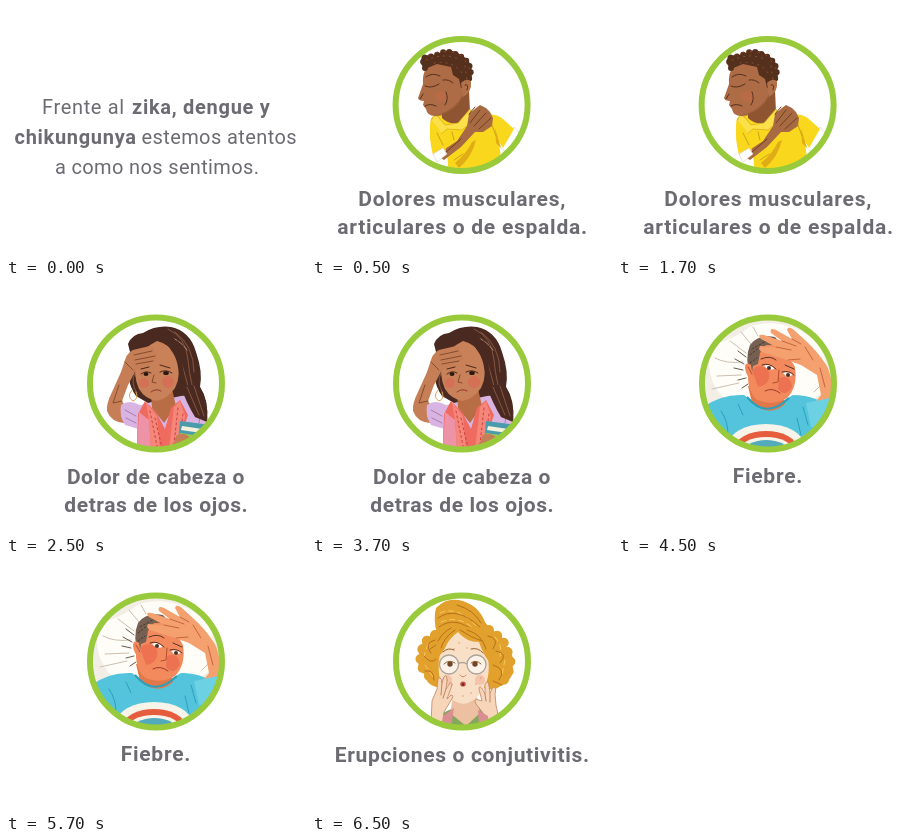
Animation, 300 px wide and 250 px high, one loop 8 s. Source, as an HTML page:

```html
<!DOCTYPE html>
<html lang="es">
<head>
<meta charset="utf-8">
<title>Síntomas</title>
<style>
  html, body { margin: 0; width: 100%; height: 100%; overflow: hidden; background: #fff; }
  svg { display: block; width: 300px; height: 250px; }
  text { font: 400 20px Roboto, sans-serif; fill: #6c6b71; }
  .b { font-weight: 700; }
  .cap text { font-size: 21px; font-weight: 700; }
  .scene { visibility: hidden; animation: 8s step-end infinite; }
  #intro { animation-name: intro; }
  #muscle { animation-name: muscle; }
  #head { animation-name: head; }
  #fever { animation-name: fever; }
  #rash { animation-name: rash; }
  @keyframes intro { 0% { visibility: visible } 6.25%, 100% { visibility: hidden } }
  @keyframes muscle { 0% { visibility: hidden } 6.25% { visibility: visible } 31.25%, 100% { visibility: hidden } }
  @keyframes head { 0% { visibility: hidden } 31.25% { visibility: visible } 56.25%, 100% { visibility: hidden } }
  @keyframes fever { 0% { visibility: hidden } 56.25% { visibility: visible } 81.25%, 100% { visibility: hidden } }
  @keyframes rash { 0% { visibility: hidden } 81.25%, 100% { visibility: visible } }
  .ring { fill: none; stroke: #98ca3c; stroke-width: 6; }
  .ln { fill: none; stroke-width: 1; stroke-linecap: round; stroke-linejoin: round; }
  .curl { fill: none; stroke-linecap: round; stroke-linejoin: round; }
</style>
</head>
<body>
<svg viewBox="0 0 300 250">
  <defs>
    <clipPath id="disc"><circle cx="150" cy="99.300" r="65"/></clipPath>
    <circle id="ring" class="ring" cx="150" cy="99.400" r="66"/>
  </defs>

  <g id="intro" class="scene">
    <text x="36" y="108" letter-spacing=".65">Frente al</text>
    <text class="b" x="126" y="108" letter-spacing=".72">zika, dengue y</text>
    <text class="b" x="8.500" y="138" letter-spacing=".7">chikungunya</text>
    <text x="135.500" y="138" letter-spacing=".4">estemos atentos</text>
    <text x="49" y="168" letter-spacing=".35">a como nos sentimos.</text>
  </g>

  <g id="muscle" class="scene">
    <g clip-path="url(#disc)">
      <path fill="#a86a43" d="M196 138L206 132 216 145 212 160 202 152Z"/>
      <path fill="#fff" stroke="#d8cdbd" stroke-width=".6" d="M188 141L202 121 210 130 197 149Z"/>
      <path fill="#f9d71c" d="M119 112Q126 106 142 109L158 105 174 108Q187 108 192 114L202 123 191 142 187 136 191 170H137L135 148 122 150Q116 130 119 112Z"/>
      <path fill="#e0ad17" d="M183 122L189 142 184 137ZM160 136Q154 148 143 157L147 162Q160 151 164 134Z"/>
      <path fill="#8f5431" d="M130 102L143 90 157 84 158 106 146 117Q137 119 130 112Z"/>
      <path fill="#fbe04a" stroke="#d9a81a" stroke-width=".7" d="M123 107L133 119 146 117 158 103 163 113 150 124 135 123 129 128 119 115Z"/>
      <path fill="#ad6c45" d="M115 61Q110 68 111 78L106 92Q107 95 112 95L111 99 114 103Q115 110 123 110Q136 108 146 98L154 86 152 60Q132 50 115 61Z"/>
      <path fill="#8f5431" opacity=".5" d="M121 110Q136 107 146 96L153 85 151 98Q140 112 121 110Z"/>
      <path fill="#55301d" d="M113 63Q107 58 110 51Q117 48 124 49Q137 40 149 49Q160 54 160 67Q160 76 154 82L149 82 147 73 141 69 139 61 125 58Z"/>
      <path class="curl" stroke="#55301d" stroke-width="6" stroke-dasharray="0 6.500" d="M113 62L110 52 122 50 134 45 147 49 157 57 159 68 154 80"/>
      <path class="ln" stroke="#8a5433" stroke-width="2" stroke-dasharray="1 5" d="M114 54Q134 46 148 54M122 57Q141 54 150 67M153 60L155 75"/>
      <path class="ln" stroke="#a5402c" stroke-width="1.500" stroke-dasharray="1 7" d="M117 49Q136 41 151 51L159 65"/>
      <path fill="#b3714a" d="M149 77Q156 71 159 76Q160 86 151 91Z"/>
      <path fill="#c5694a" opacity=".5" d="M122 88Q131 82 137 88Q136 97 126 96Z"/>
      <path class="ln" stroke="#53301f" d="M114 71Q120 66 128 70M113 80Q119 83 127 78M113 100Q118 97 124 100M111 88L108 93M153 79Q157 77 155 84M134 86Q137 93 133 99M131 74Q137 73 141 77"/>
      <path fill="#a86a43" d="M124 149L145 135 155 120 157 108 164 102 168 99 174 102 178 106 181 112 180 120 171 126 163 126 149 141 132 154Z"/>
      <path class="ln" stroke="#70401f" d="M158 117L168 104M162 120L174 107M167 123L179 112M133 147L149 133M157 108L163 101"/>
      <path fill="#f9d71c" d="M119 114Q127 121 132 133L134 145 121 149Q116 130 119 114Z"/>
      <path fill="#fff" stroke="#d8cdbd" stroke-width=".6" d="M121 148L131 142 135 148 125 156Z"/>
      <path class="ln" stroke="#d0a017" d="M125 127L131 139M180 119L184 130M151 148L142 154M140 126L142 134"/>
    </g>
    <use href="#ring" x="-.4" y="-.4"/>
    <g class="cap">
      <text x="46.200" y="200" letter-spacing=".8">Dolores musculares,</text>
      <text x="25.300" y="228" letter-spacing=".74">articulares o de espalda.</text>
    </g>
  </g>

  <g id="head" class="scene">
    <g clip-path="url(#disc)">
      <path fill="#4a2a20" d="M130 112Q118 95 126 76L122 60Q126 50 137 49Q150 41 165 43Q184 47 190 68Q197 88 194 103Q203 116 201 137L188 135 168 115 142 119Z"/>
      <path class="ln" stroke="#855540" stroke-width="1.300" d="M162 45Q180 53 182 76Q184 101 194 125M169 48Q188 62 188 88M170 62Q179 88 187 122M147 48Q135 51 131 61M129 89Q124 99 131 109"/>
      <path class="ln" stroke="#b08a78" stroke-width="2" stroke-dasharray="5 2" d="M160 52Q172 54 181 66"/>
      <path fill="#d9b4e2" d="M131 122L151 117 175 112Q191 110 202 133L205 151 180 145 175 165H131Z"/>
      <path fill="#b86d45" d="M145 107L166 105 170 122 158 139 146 124Z"/>
      <path fill="#c98159" d="M130 76Q137 64 151 57Q164 60 171 73Q176 90 169 104Q161 115 151 117Q139 115 133 105Q127 92 130 76Z"/>
      <path fill="#4a2a20" d="M151 52Q143 61 133 68L127 65Q130 52 146 46Q166 44 174 65L181 109 172 105Q175 82 167 69Q161 59 151 52Z"/>
      <g fill="#dc6354" opacity=".55"><circle cx="138" cy="99" r="5"/><circle cx="162" cy="98" r="6"/></g>
      <g fill="#2c1812"><ellipse cx="140" cy="90" rx="2.500" ry="2"/><ellipse cx="160" cy="89" rx="2.800" ry="2"/></g>
      <path class="ln" stroke="#472718" stroke-width="1.300" d="M135 90Q140 86 145 89M154 88Q160 85 166 89M135 85L143 83M154 81L164 84"/>
      <path class="ln" stroke="#83472f" d="M148 91L146 98 150 99"/>
      <path class="ln" stroke="#90362d" stroke-width="1.500" d="M145 108Q150 104 155 107"/>
      <path class="ln" stroke="#d8a35e" d="M126 106Q120 113 127 117Q133 115 130 108"/>
      <path fill="#c57e56" d="M101 127Q100 120 106 108L115 88 119 76Q122 66 131 65L144 62Q150 63 147 67Q154 68 150 72Q154 76 147 77Q148 81 139 82L130 86 122 101 116 117 122 126 118 139Q105 138 101 127Z"/>
      <path class="ln" stroke="#864c2e" d="M128 71L146 67M129 76L149 72M130 80L147 77M119 78L127 86M113 101L107 119 116 117"/>
      <path fill="#d9b4e2" d="M115 121Q123 115 134 121L136 146 119 141Q113 132 115 121Z"/>
      <path class="ln" stroke="#a77dac" d="M119 126L130 132M120 134L130 139M184 117L190 133M195 125L193 139"/>
      <path fill="#ef6a5f" d="M139 117L150 128 159 145 165 124 174 116 182 131 176 148 175 165H131L132 130Z"/>
      <path fill="#ee92a8" d="M133 128L143 136 145 165H131Z"/>
      <path fill="#f4867a" d="M140 118L151 132 154 165H145L143 137ZM168 123L174 117 179 132 172 165H163Z"/>
      <path class="ln" stroke="#cf3f40" stroke-dasharray="2 3" d="M144 127L151 162M149 134L156 164M172 124L168 160M177 130L173 158"/>
      <path fill="#4a2a20" d="M174 101Q181 120 189 133L201 138Q203 118 193 101Z"/>
      <path class="ln" stroke="#855540" d="M181 103L193 131M188 102L198 132"/>
      <path fill="#4a9bac" d="M174 137L205 141 199 165 172 159Z"/>
      <path fill="#f5f1db" d="M176 142L203 146 202 150 175 146Z"/>
      <path fill="#9ccb55" d="M174 149L201 153 200 156 173 152Z"/>
      <path fill="#c57e56" d="M170 152Q177 147 184 153L178 163 167 163Z"/>
    </g>
    <use href="#ring"/>
    <g class="cap">
      <text x="60.900" y="200" letter-spacing=".55">Dolor de cabeza o</text>
      <text x="58.300" y="228" letter-spacing=".58">detras de los ojos.</text>
    </g>
  </g>

  <g id="fever" class="scene">
    <g clip-path="url(#disc)">
      <path fill="#f2eee6" d="M80 30H220V170H80Z"/>
      <path fill="#fffdf8" d="M92 62Q117 55 133 42Q169 32 202 60L215 101 188 120 105 113Q87 95 92 62Z"/>
      <path class="ln" stroke="#cbbfae" d="M97 74Q108 80 125 78M99 92L123 91M112 57L128 69M94 105L121 99M135 43L140 52M205 99L196 108M123 48L133 60"/>
      <path class="ln" stroke="#645a4e" d="M117 75L126 80M116 84L125 86M120 67L128 73M120 96L128 94M124 104L130 100"/>
      <path fill="#53c4dc" d="M82 126Q100 110 126 111L140 121 161 119 175 111Q201 111 216 128V170H80Z"/>
      <path fill="#e27848" d="M130 102L164 105 167 120Q152 134 134 119Z"/>
      <path fill="#f28a5d" d="M137 61Q149 53 164 61L177 83Q180 103 169 114Q154 123 138 115Q127 104 131 80Z"/>
      <path fill="#e85f48" opacity=".55" d="M134 86Q144 77 151 88Q153 101 140 103ZM161 94Q173 90 174 103Q167 114 160 105Z"/>
      <path fill="#766052" d="M133 94Q126 75 132 61Q140 50 157 53L164 61 148 61 142 69 140 80 135 82Z"/>
      <path class="ln" stroke="#483a31" stroke-dasharray="2 2" d="M134 65L150 56M132 71L142 63M132 79L139 74"/>
      <path fill="#f28a5d" d="M133 81Q127 77 127 84Q128 94 135 94Z"/>
      <path fill="#fff" d="M146 82Q151 79 157 85L151 86ZM165 89Q171 87 175 91L169 93Z"/>
      <g fill="#4c2e26"><circle cx="151" cy="84" r="2"/><circle cx="170" cy="91" r="2"/></g>
      <path class="ln" stroke="#583225" stroke-width="1.300" d="M144 81Q151 78 158 85M164 88Q171 86 176 91M143 75Q152 71 158 76M167 81L176 85"/>
      <path class="ln" stroke="#b34c32" d="M161 86L160 98 155 99M130 83L134 90"/>
      <path class="ln" stroke="#9d392c" stroke-width="1.700" d="M147 107Q154 103 162 109"/>
      <path fill="#f4a16f" d="M190 127L203 111 199 91 183 81 169 76 147 69Q139 67 142 62L158 63 143 55Q138 50 146 51L164 57 153 49Q151 43 158 46L174 55 169 46Q170 41 176 46L188 57Q198 66 207 79Q216 91 215 128L204 136Z"/>
      <path class="ln" stroke="#c5653e" d="M158 63L173 66M164 57L178 62M174 55L183 60M170 76L182 75M187 63L195 76M202 84L207 103"/>
      <path fill="#6dd1e4" d="M188 119L217 113V145L193 143Z"/>
      <path fill="none" stroke="#2c9fba" stroke-width="2" d="M129 113Q148 136 171 114"/>
      <path class="ln" stroke="#2c9fba" d="M103 127Q110 137 110 150M92 132L101 150M185 123L190 141M120 120L125 131M179 134L183 151"/>
      <ellipse cx="148" cy="161" rx="38" ry="21" fill="#f8f4e9"/>
      <ellipse cx="148" cy="164" rx="31" ry="17" fill="#e65d3e"/>
      <ellipse cx="148" cy="167" rx="27" ry="14" fill="#f8f4e9"/>
      <path fill="#53aabb" d="M131 160Q148 152 166 160L162 165H133Z"/>
    </g>
    <use href="#ring"/>
    <g class="cap"><text x="114.700" y="199" letter-spacing=".75">Fiebre.</text></g>
  </g>

  <g id="rash" class="scene">
    <g clip-path="url(#disc)">
      <path fill="#e2a02c" d="M125 72Q121 57 124 46Q133 36 147 38Q166 42 173 60L179 68Q192 72 192 84Q203 90 200 102Q204 114 192 122L182 128 170 126H130Q113 124 114 113Q103 107 108 95Q104 84 114 79Q117 72 125 72Z"/>
      <path class="curl" stroke="#e2a02c" stroke-width="10" stroke-dasharray="0 10" d="M123 73L113 80 109 91 108 103 116 112 121 122M177 68L190 77 195 88 199 102 195 114 187 124"/>
      <path class="ln" stroke="#f4c95a" stroke-width="2" stroke-dasharray="5 4" d="M128 51Q146 43 165 65M129 60Q146 53 161 66M116 82L112 94M183 75Q191 84 188 94M193 98L190 113M113 103L121 115"/>
      <path class="ln" stroke="#b56f1c" stroke-width="1.200" d="M126 56Q144 43 168 65M127 65Q143 53 163 70M145 43Q162 48 169 61M123 78Q111 81 119 91M112 94Q119 103 124 97M113 109Q122 107 122 118M176 74Q188 76 181 87M184 89Q197 91 188 101M181 103Q195 107 187 118M181 119L190 123M118 87L124 83"/>
      <path fill="#84a75b" d="M115 170L125 154 143 145 168 146 183 155 190 170Z"/>
      <path fill="#ecc0a0" d="M141 135H165L168 151 154 164 138 151Z"/>
      <path fill="#f9dfc6" d="M128 91Q130 72 149 67Q169 68 175 91Q180 112 171 128Q162 141 151 142Q138 140 131 127Q124 111 128 91Z"/>
      <path fill="#e2a02c" d="M125 96Q122 81 128 70Q139 60 155 65Q173 67 178 85L179 102Q171 93 167 80Q154 80 146 70Q139 75 135 82Q131 91 125 96Z"/>
      <path class="ln" stroke="#b56f1c" d="M129 86Q132 75 143 68M148 68Q160 76 170 79M126 79Q131 70 139 66M155 68Q170 72 174 87"/>
      <g fill="#f2a68e" opacity=".5"><circle cx="135" cy="118" r="5"/><circle cx="168" cy="118" r="5"/></g>
      <g fill="#dc8b70"><circle cx="147" cy="81" r=".7"/><circle cx="155" cy="86" r=".7"/><circle cx="142" cy="87" r=".7"/><circle cx="135" cy="118" r=".7"/><circle cx="140" cy="123" r=".7"/><circle cx="164" cy="122" r=".7"/><circle cx="169" cy="116" r=".7"/><circle cx="151" cy="134" r=".7"/><circle cx="159" cy="131" r=".7"/></g>
      <g fill="#fff" fill-opacity=".6" stroke="#aaa49b" stroke-width="1.300"><circle cx="137" cy="102.500" r="9.500"/><circle cx="164.500" cy="102.500" r="9.500"/><path fill="none" d="M146 102Q150 99 155 102"/></g>
      <g fill="#6f4629"><circle cx="138" cy="102" r="2.700"/><circle cx="163" cy="102" r="2.700"/></g>
      <path class="ln" stroke="#93602a" stroke-width="1.200" d="M132 102Q137 97 143 101M159 101Q164 97 169 102M131 90Q136 85 142 88M159 87Q166 85 171 91"/>
      <path class="ln" stroke="#c78766" d="M148 113Q151 117 154 113"/>
      <ellipse cx="151" cy="122" rx="2.800" ry="2.600" fill="#c85448"/>
      <ellipse cx="151" cy="122.500" rx="1.300" ry="1.200" fill="#632722"/>
      <path fill="#f6d5b9" stroke="#bf8464" stroke-width=".8" stroke-linejoin="round" d="M119 162L120 139 125 127 126 117Q129 113 130 121L132 115Q135 111 135 119L134 127 138 121Q141 119 139 126L135 137 139 133Q143 133 138 140L132 150 130 165ZM178 165L171 151 164 142Q161 136 167 138L170 139 167 127Q167 122 171 128L173 132 173 122Q176 117 177 124L178 131 181 125Q185 125 183 132L184 143 188 162Z"/>
      <path class="ln" stroke="#bf8464" d="M130 121L129 133M134 127L131 136M173 132L174 139M178 131L178 140"/>
      <path fill="#d98f92" d="M131 154L142 146 139 165H130ZM166 148L176 154 177 165H167Z"/>
    </g>
    <use href="#ring"/>
    <g class="cap"><text x="22.800" y="200" letter-spacing=".65">Erupciones o conjutivitis.</text></g>
  </g>
</svg>
</body>
</html>
```
